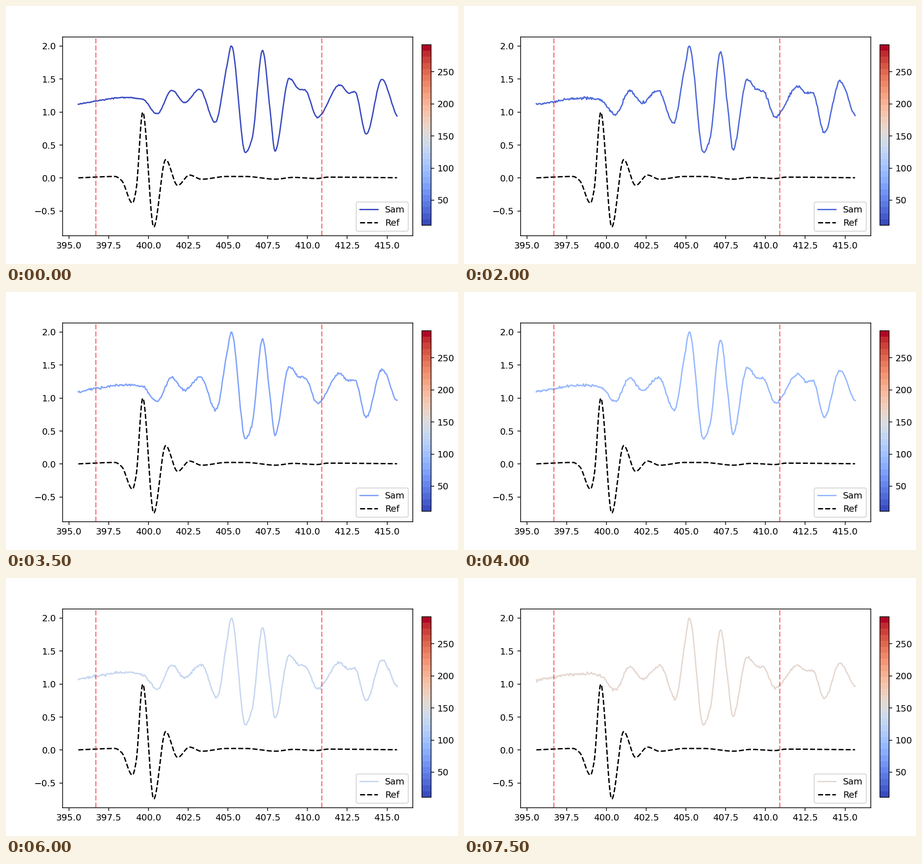
Recreate the animation shown at these times as a matplotlib script. Size 990 by 566 pixels, loop 8 s.

```python
import numpy as np
import matplotlib.pyplot as plt
from matplotlib.animation import FuncAnimation
from matplotlib.cm import ScalarMappable
from matplotlib.colors import Normalize
from matplotlib.lines import Line2D

W, H, DPI = 990, 566, 141.5
TEMPS = [*range(10, 40, 5), 50, 70, *range(90, 170, 10)]
T_MIN, T_MAX = 10.9, 292.2
TIME = np.linspace(395.6, 415.63, 400)

# Turning points (time, signal) of the coldest sample trace
SAM = np.array([
    (395.6, 1.122), (398.7, 1.222), (399.66, 1.19), (400.55, 0.97),
    (401.47, 1.33), (402.27, 1.143), (403.22, 1.343), (404.2, 0.843),
    (404.92, 1.675), (405.22, 2.0), (406.1, 0.383), (406.52, 0.597),
    (407.18, 1.935), (407.64, 1.053), (407.96, 0.411), (408.85, 1.51),
    (409.5, 1.345), (409.85, 1.335), (410.62, 0.92), (412.03, 1.412),
    (412.6, 1.288), (412.98, 1.309), (413.7, 0.666), (414.68, 1.495),
    (415.63, 0.943),
])

# Reference pulse: main swing, geometric ring-down, faint tail
RING = [(400.34 + 0.75 * k, -0.7 * (-0.4) ** k) for k in range(1, 5)]
REF = np.array([
    (395.6, 0.003), (397.9, 0.024), (398.33, -0.04), (399.0, -0.38),
    (399.23, -0.18), (399.65, 1.0), (400.34, -0.742), *RING,
    (404.9, 0.024), (406.1, 0.024), (408.0, -0.017), (409.1, 0.01),
    (410.6, -0.007), (411.3, 0.014), (415.63, 0.005),
])


def smooth(knots, x):
    """Monotone cubic through the knots; turning points stay level."""
    kx, ky = knots.T
    h = np.diff(kx)
    d = np.diff(ky) / h
    m = np.zeros_like(kx)
    m[0], m[-1] = d[0], d[-1] / 2
    same = d[:-1] * d[1:] > 0
    a, b = d[:-1][same], d[1:][same]
    m[1:-1][same] = 2 * a * b / (a + b)
    i = np.clip(np.searchsorted(kx, x) - 1, 0, len(h) - 1)
    t = (x - kx[i]) / h[i]
    return (ky[i] * (1 + 2 * t) * (1 - t) ** 2
            + ky[i + 1] * t * t * (3 - 2 * t)
            + h[i] * t * (1 - t) * (m[i] * (1 - t) - m[i + 1] * t))


def sample(i):
    """Warming lowers the early part, damps the late echoes, delays a dip."""
    u = (i / (len(TEMPS) - 1)) ** 1.4
    t, v = SAM.T
    damping = 0.125 * np.sqrt(np.maximum(t - 406.2, 0))
    v = 1 + (v - 1) * (1 - u * damping) - 0.065 * u * (t < 405)
    t = t + 0.25 * u * np.exp(-((t - 403.7) / 0.7) ** 2)
    noise = 0.01 * (1 - 0.6 * np.exp(-i))
    rng = np.random.default_rng(40 + i)
    y = smooth(np.column_stack([t, v]), TIME)
    return np.minimum(y + rng.normal(0, noise, TIME.size), 2)


fig, ax = plt.subplots(figsize=(6.9965, 4), dpi=DPI)
ax.set_xlim(394.605, 416.621)
ax.set_ylim(-0.872, 2.137)

cmap = plt.get_cmap("coolwarm")
sam, = ax.plot(TIME, sample(0), color=cmap(0.0), label="Sam")
ax.plot(TIME, smooth(REF, TIME), "k--", label="Ref")
for edge in (396.7, 410.9):
    ax.axvline(edge, color="red", ls="--", alpha=0.5, snap=False)
key = ax.legend(loc="lower right").get_lines()[0]

cax = fig.add_axes([911 / W, 85 / H, 20 / W, 396 / H])
bands = ScalarMappable(Normalize(T_MIN, T_MAX), plt.get_cmap("coolwarm", 30))
fig.colorbar(bands, cax=cax)
# Tip of the axis label that runs off the right edge
fig.add_artist(Line2D([989.5 / W] * 2, [338 / H, 342 / H],
                      color="0.45", lw=72 / DPI))


def update(i):
    color = cmap((TEMPS[i] - 10) / 282)
    sam.set_ydata(sample(i))
    sam.set_color(color)
    key.set_color(color)
    return sam, key


anim = FuncAnimation(fig, update, frames=len(TEMPS), interval=500,
                     repeat=True, repeat_delay=0)
plt.show()
```
